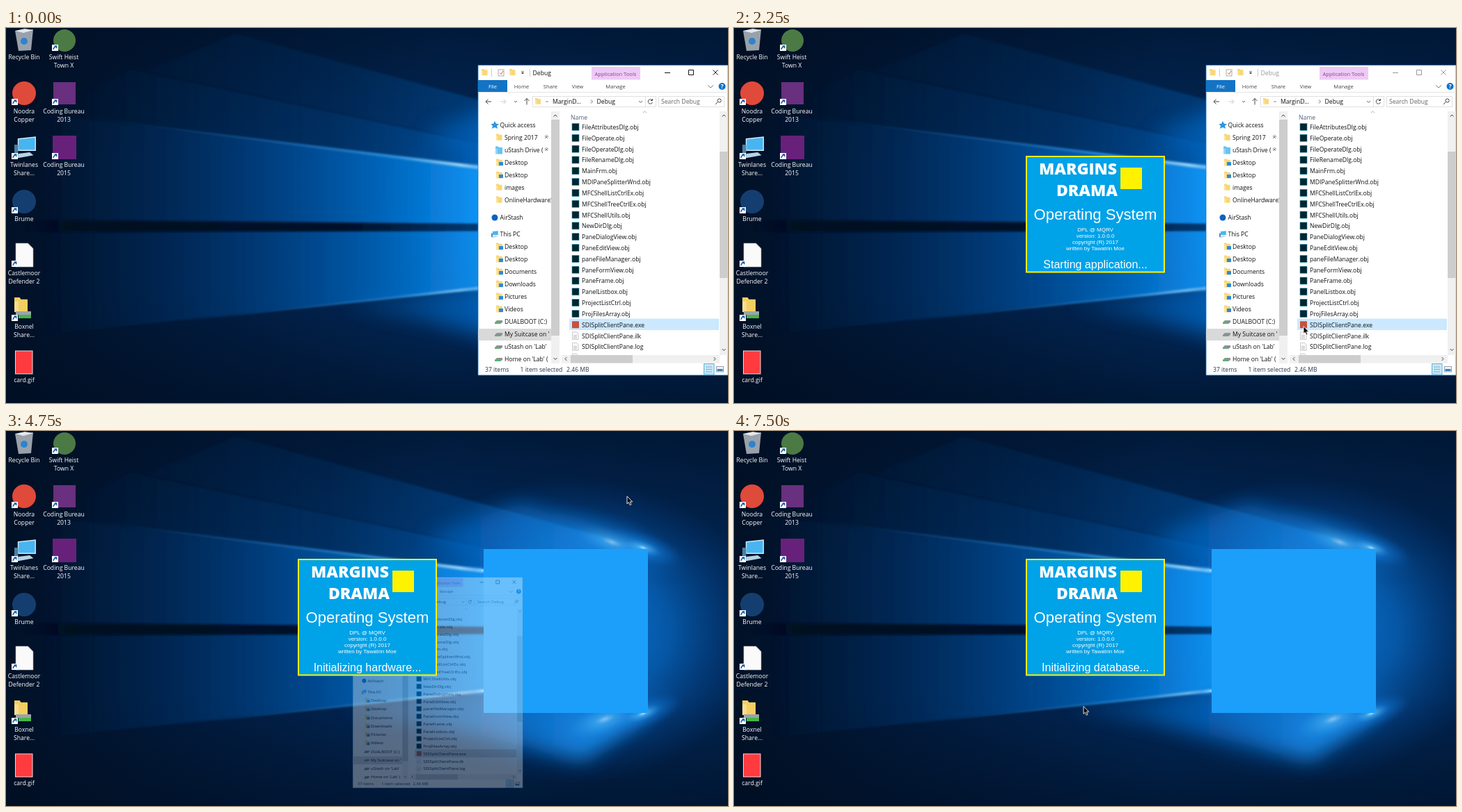
Animation, 1037 px wide and 540 px high, one loop 8 s. Source, as an HTML page:

```html
<!DOCTYPE html>
<html lang="en">
<head>
<meta charset="utf-8">
<title>Desktop startup</title>
<style>
html, body { margin: 0; width: 100%; height: 100%; overflow: hidden; background: #01142e; }
svg { display: block; width: 100vw; height: 100vh; }
text { font: 8.65px "Open Sans", "Noto Sans", sans-serif; fill: #111; white-space: pre; }
.label text { fill: #fff; text-anchor: middle; }
.ribbon text { font-size: 7.6px; fill: #444; text-anchor: middle; }
.splash text { font-family: "Liberation Sans", Arial, sans-serif; fill: #fff; text-anchor: middle; }
.splash .brand { font: 800 23px "Open Sans", sans-serif; text-anchor: end; }
.splash .title { font-size: 22.1px; }
.splash .small { font-size: 8px; }
.splash .status { font-size: 16px; }
.line { fill: none; stroke: #444; }
</style>
</head>
<body>
<svg id="stage" viewBox="0 0 1037 540" preserveAspectRatio="none"></svg>
<script>
const text = (x, y, s, attrs = '') => `<text x="${x}" y="${y}" ${attrs}>${s}</text>`;
const rect = (x, y, w, h, fill, attrs = '') =>
  `<rect x="${x}" y="${y}" width="${w}" height="${h}" fill="${fill}" ${attrs}/>`;
const disc = (x, y, r, fill) => `<circle cx="${x}" cy="${y}" r="${r}" fill="${fill}"/>`;
const poly = (points, fill, attrs = '') => `<polygon points="${points}" fill="${fill}" ${attrs}/>`;
const line = (d, attrs = '') => `<path class="line" d="${d}" ${attrs}/>`;
const stops = list => list.map(([at, color, alpha = 1]) =>
  `<stop offset="${at}" stop-color="${color}" stop-opacity="${alpha}"/>`).join('');
const across = (id, x1, x2, list) =>
  `<linearGradient id="${id}" gradientUnits="userSpaceOnUse" x1="${x1}" x2="${x2}" y1="0" y2="0">${stops(list)}</linearGradient>`;
const radial = (id, list) => `<radialGradient id="${id}">${stops(list)}</radialGradient>`;
const glow = (x, y, rx, ry, id, attrs = '') =>
  `<ellipse cx="${x}" cy="${y}" rx="${rx}" ry="${ry}" fill="url(#${id})" ${attrs}/>`;
const blur = (id, amount) =>
  `<filter id="${id}" x="-20%" y="-50%" width="140%" height="200%"><feGaussianBlur stdDeviation="${amount}"/></filter>`;

function wallpaper() {
  const defs = `<defs>
    ${across('base', 0, 1037, [[0, '#011127'], [.3, '#011d42'], [.6, '#022a5c'], [1, '#01244f']])}
    <linearGradient id="shade" x2="0" y2="1">${stops([[0, '#000d20', .55], [.35, '#000d20', 0], [.7, '#000d20', 0], [1, '#000d20', .6]])}</linearGradient>
    ${across('beam', 50, 690, [[0, '#013064', 0], [.3, '#023a78', .45], [.6, '#0456a6', .78], [.85, '#067ad8', .92], [1, '#0a96f6']])}
    ${across('haze', 100, 923, [[0, '#04488c', 0], [.45, '#04488c', .45], [.7, '#0868c4', .75], [1, '#22a0ff', .95]])}
    ${across('gap', 20, 690, [[0, '#000b1c', 0], [.12, '#000b1c', .85], [.7, '#000f26', .9], [1, '#02376e', .85]])}
    ${across('ray', 60, 686, [[0, '#1a78d0', 0], [.3, '#1a7ad6', .5], [.8, '#36a5f8', .85], [1, '#c8f0ff']])}
    ${radial('halo', [[0, '#0a88f0', .95], [.5, '#0870d0', .65], [1, '#04489a', 0]])}
    ${radial('flare', [[0, '#e8fbff', .95], [.12, '#5cc4ff', .75], [.45, '#1585e8', .4], [1, '#0a68c4', 0]])}
    ${blur('soft', 1.5)}${blur('wide', 14)}
    <clipPath id="nav"><rect x="678" y="120" width="105" height="363"/></clipPath>
    <clipPath id="list"><rect x="797" y="120" width="228" height="351"/></clipPath>
  </defs>`;
  return defs + rect(0, 0, 1037, 540, 'url(#base)') + rect(0, 0, 1037, 540, 'url(#shade)')
    + glow(815, 287, 280, 220, 'halo')
    + poly('923,170 330,8 200,62 787,189', 'url(#haze)', 'opacity=".45" filter="url(#soft)"')
    + poly('923,172 740,105 600,150 686,200', 'url(#haze)', 'opacity=".8" filter="url(#wide)"')
    + poly('787,189 180,60 50,122 686,201', 'url(#haze)', 'opacity=".8" filter="url(#soft)"')
    + poly('923,403 686,374 480,398 690,440 830,475', 'url(#haze)', 'opacity=".95" filter="url(#wide)"')
    + poly('690,202 50,124 50,278 690,283', 'url(#beam)', 'filter="url(#soft)"')
    + poly('690,292 50,293 50,442 690,374', 'url(#beam)', 'opacity=".9" filter="url(#soft)"')
    + poly('20,276 690,282 690,292 20,294', 'url(#gap)', 'filter="url(#soft)"')
    + poly('60,123 686,199 686,204', 'url(#ray)', 'filter="url(#soft)"')
    + poly('250,422 686,372 686,376', 'url(#ray)', 'opacity=".8" filter="url(#soft)"')
    + glow(686, 201, 34, 8, 'flare', 'transform="rotate(7 686 201)"')
    + glow(686, 374, 34, 8, 'flare', 'transform="rotate(-7 686 374)"')
    + glow(915, 168, 60, 22, 'flare', 'transform="rotate(18 915 168)"')
    + glow(870, 160, 120, 42, 'flare', 'opacity=".55" transform="rotate(20 870 160)"')
    + glow(915, 407, 60, 22, 'flare', 'transform="rotate(-20 915 407)"')
    + glow(860, 415, 120, 48, 'flare', 'opacity=".55" transform="rotate(-20 860 415)"')
    + rect(686, 170, 236, 236, '#1c9ffa');
}

const folder = (x, y, fill = '#f8d775', s = 1) =>
  `<g transform="translate(${x} ${y}) scale(${s})">${poly('0,0 4,0 5,1.5 10,1.5 10,11 0,11', fill)}${rect(0, 3, 3, 8, '#fff', 'opacity=".3"')}</g>`;
const monitor = (x, y, s) =>
  `<g transform="translate(${x} ${y}) scale(${s})">${poly('2,1 11,0 11,7 2,7', '#48b5f0', 'stroke="#cfeaf8" stroke-width=".5"')}${poly('0,9 8,8 10,9.5 2,11', '#b8d4e4')}${rect(0, 4, 2, 6, '#4c7e9e')}</g>`;
const drive = (x, y) => poly(`${x},${y + 5} ${x + 3},${y + 2} ${x + 11},${y + 2} ${x + 11},${y + 5} ${x + 8},${y + 7} ${x},${y + 7}`, '#8b9297')
  + rect(x + 1, y + 5, 5, 1.5, '#39c94c');
const shortcut = (x, y) => rect(x, y, 9, 9, '#fff')
  + line(`M${x + 2} ${y + 7}Q${x + 2} ${y + 4} ${x + 6.5} ${y + 2.5}M${x + 3.5} ${y + 2}h3.2v3.2`, 'style="stroke:#145ca8;stroke-width:1.4"');
const sheet = (x, y, w, h) => poly(`${x},${y} ${x + w * .7},${y} ${x + w},${y + h * .22} ${x + w},${y + h} ${x},${y + h}`, '#fafafa', 'stroke="#aaa" stroke-width=".6"');

function desktop() {
  const icons = [
    [26, 45, ['Recycle Bin'], poly('13,4 39,2 36,32 18,33', '#b4bcc3', 'opacity=".85"') + poly('13,4 27,1 39,3 25,7', '#e4e8ea') + disc(26, 19, 5, '#2e83cf')],
    [83, 45, ['Swift Heist', 'Town X'], disc(84, 18, 16, '#4c7a45'), 24],
    [26, 123, ['Noodra', 'Copper'], disc(26, 94, 17, '#e04a3a'), 102],
    [83, 123, ['Coding Bureau', '2013'], rect(68, 78, 32, 32, '#68307f'), 102],
    [26, 200, ['Twinlanes', 'Share...'], monitor(12, 157, 2.75), 180],
    [83, 200, ['Coding Bureau', '2015'], rect(67, 155, 34, 34, '#68217a'), 180],
    [26, 278, ['Brume'], disc(26, 250, 17, '#153e70'), 258],
    [26, 356, ['Castlemoor', 'Defender 2'], sheet(14, 310, 25, 34), 335],
    [26, 433, ['Boxnel', 'Share...'], folder(12, 388, '#f3cf62', 1.9) + rect(14, 408, 22, 5, '#9aa5a8') + rect(18, 413, 18, 5, '#43b649'), 413],
    [26, 510, ['card.gif'], rect(13.5, 465, 24.5, 33, '#ff3b40', 'stroke="#f5d8d8"')]
  ];
  return '<g class="label">' + icons.map(([x, y, names, art, arrowY]) =>
    art + (arrowY ? shortcut(x === 26 ? 8 : 66, arrowY) : '')
    + names.map((name, i) => text(x, y + i * 12, name)).join('')).join('') + '</g>';
}

function navigation() {
  const items = [
    ['Quick access', 143, 'star'], ['Spring 2017', 161], ['uStash Drive (', 179, 'blue'], ['Desktop', 197, 'badge'],
    ['Desktop', 215, 'badge'], ['images', 233], ['OnlineHardwareS', 251], ['AirStash', 276, 'cloud'],
    ['This PC', 300, 'pc'], ['Desktop', 318, 'badge'], ['Desktop', 336, 'badge'], ['Documents', 354, 'badge'],
    ['Downloads', 372, 'badge'], ['Pictures', 390, 'badge'], ['Videos', 408, 'badge'], ['DUALBOOT (C:)', 426, 'drive'],
    ["My Suitcase on '", 444, 'drive'], ["uStash on 'Lab'", 462, 'drive'], ["Home on 'Lab' (", 480, 'drive']
  ];
  const art = {
    star: y => poly(`702,${y - 9} 704,${y - 5} 708,${y - 5} 705,${y - 2} 706,${y + 2} 702,${y} 698,${y + 2} 699,${y - 2} 696.5,${y - 5} 700,${y - 5}`, '#2b95e0'),
    blue: y => folder(703, y - 8.5, '#66c3f2'),
    badge: y => folder(704, y - 8.5, '#f8d775', .9) + rect(708, y - 4, 6, 5, '#3189d4'),
    cloud: y => disc(702, y - 3, 4.5, '#0a63c2'),
    pc: y => monitor(697, y - 8, .9),
    drive: y => drive(702, y - 7)
  };
  const pin = y => line(`M774 ${y}l3-3m-3-1l4 4m-2-5l3 3`, 'style="stroke:#777"');
  return '<g clip-path="url(#nav)">' + rect(678, 433, 105, 17, '#d9d9d9')
    + items.map(([name, y, kind]) => (art[kind] ? art[kind](y) : folder(704, y - 8.5, '#f8d775', .85))
      + text(/star|cloud|pc/.test(kind) ? 709.5 : 716, y, name)).join('')
    + pin(159) + pin(177) + '</g>'
    + rect(783, 120, 12, 363, '#f0f0f0') + rect(783, 132, 12, 311, '#cdcdcd')
    + line('M786.5 127.5l2.5-2.5 2.5 2.5M786.5 475l2.5 2.5 2.5-2.5');
}

function fileList() {
  const objects = `FileAttributesDlg FileOperate FileOperateDlg FileRenameDlg MainFrm MDIPaneSplitterWnd
    MFCShellListCtrlEx MFCShellTreeCtrlEx MFCShellUtils NewDirDlg PaneDialogView PaneEditView paneFileManager
    PaneFormView PaneFrame PanelListbox ProjectListCtrl ProjFilesArray`.split(/\s+/).map(name => name + '.obj');
  const files = [...objects, ...['exe', 'ilk', 'log'].map(ext => 'SDISplitClientPane.' + ext)];
  const icon = (name, y) => name.endsWith('obj') ? rect(813, y - 8.5, 10, 10, '#04252f', 'stroke="#1f8ea8" stroke-width=".6"')
    : name.endsWith('exe') ? rect(813, y - 8.5, 10, 10, '#c8503c')
    : sheet(813.5, y - 9, 8.5, 11) + line(`M815 ${y - 4}h5m-5 2h5m-5 2h5`, 'style="stroke:#999;stroke-width:.6"');
  return rect(809, 418.5, 215, 16.5, '#cce8ff') + rect(809, 418.5, 215, 16.5, '#d9d9d9', 'id="dimRow"')
    + '<g clip-path="url(#list)">' + text(811, 132, 'Name', 'style="fill:#4c607a"')
    + files.map((name, i) => {
      const y = 146 + i * 15.82;
      return icon(name, y) + text(827, y, name);
    }).join('') + sheet(813.5, 469, 8.5, 11) + '</g>'
    + line('M915 122l2.5-2 2.5 2', 'style="stroke:#888;stroke-width:.7"')
    + rect(1025, 120, 11.5, 351, '#f0f0f0') + rect(1025, 178, 11.5, 182, '#cdcdcd')
    + rect(798, 471, 227, 11.5, '#f0f0f0') + rect(811, 471, 89, 11.5, '#cdcdcd')
    + line('M1028.5 127.5l2.5-2.5 2.5 2.5M1028.5 462l2.5 2.5 2.5-2.5M805.5 474l-2.5 2.5 2.5 2.5M1016.5 474l2.5 2.5-2.5 2.5');
}

function explorer() {
  const titleBar = color => text(756.5, 67.5, 'Debug', `style="fill:${color}"`)
    + line('M946 64.5h8M980.5 60.5h7v7h-7zM1015.5 60.5l7 7m0-7l-7 7', `style="stroke:${color}"`);
  return `<g id="explorer">`
    + rect(678, 53.5, 359, 446.5, '#fff', 'stroke="#1878c0" stroke-width=".8"')
    + rect(841, 56, 70, 18.5, '#efc9f6')
    + folder(683, 59, '#f8d775', .85) + folder(723, 59, '#f8d775', .85)
    + rect(707, 60, 8, 9, '#fff', 'stroke="#999" stroke-width=".8"')
    + line('M709 64.5l2 2 3-4.5', 'style="stroke:#d2572c"')
    + line('M697.5 59v11M752.5 59v11', 'style="stroke:#ccc"') + poly('740,64 744,64 742,66.5', '#333') + line('M740 62.5h4', 'style="stroke-width:.7"')
    + `<g id="activeTitle">${titleBar('#111')}</g><g id="idleTitle">${titleBar('#999')}</g>`
    + rect(678, 75, 42, 17, '#1374c5')
    + '<g class="ribbon">' + text(699, 87, 'File', 'style="fill:#fff"') + text(740.5, 87, 'Home') + text(782, 87, 'Share')
    + text(821, 87, 'View') + text(875.5, 87, 'Manage') + text(875.5, 69, 'Application Tools', 'style="fill:#7a4a85"') + '</g>'
    + line('M1008 82.5l4 3.5 4-3.5', 'style="stroke:#777"') + disc(1028.5, 84, 5, '#0b72c8')
    + text(1028.5, 87, '?', 'text-anchor="middle" style="fill:#fff;font-weight:700"')
    + line('M678 92.5h359', 'style="stroke:#e2e3e4"')
    + line('M697 106h-8m3.5-3.5l-3.5 3.5 3.5 3.5M748 110.5v-9m-3.5 3.5l3.5-3.5 3.5 3.5')
    + line('M710 106h8m-3.5-3.5l3.5 3.5-3.5 3.5', 'style="stroke:#ccc"')
    + line('M730 105l2 2 2-2M909 105l2.5 2.5 2.5-2.5M840 103.5l2.5 2.5-2.5 2.5', 'style="stroke:#666"')
    + line('M756.5 98.5h177v15h-177zM937.5 98.5h94v15h-94zM918.5 98.5v15', 'style="stroke:#e0e0e0"')
    + folder(760, 101, '#f8d775', .8) + line('M775 106h4', 'style="stroke:#888"')
    + text(785, 109, 'MarginD...') + text(848.5, 109, 'Debug') + text(941, 109, 'Search Debug', 'style="fill:#666"')
    + line('M928 104a3.2 3.2 0 1 0 .5 3M928.5 102v2.5h-2.5')
    + line('M1022.5 106.5l-3.5 3.5M1022 104.5a2.6 2.6 0 1 1 5.2 0a2.6 2.6 0 1 1-5.2 0')
    + navigation() + fileList()
    + text(688, 494.5, '37 items', 'style="fill:#26344c"') + text(738.5, 494.5, '1 item selected', 'style="fill:#26344c"') + text(805, 494.5, '2.46 MB', 'style="fill:#26344c"')
    + rect(1002.5, 483.5, 14.5, 15.5, '#c9e8f8', 'stroke="#58b4dc"') + line('M1005.5 488h9m-9 3.5h9m-9 3.5h9', 'style="stroke:#789;stroke-dasharray:2 1"')
    + rect(1020.5, 487.5, 10, 7.5, '#eef4f8', 'stroke="#889" stroke-width=".8"') + rect(1021.5, 491, 8, 3, '#3b83b8')
    + '</g>';
}

function splash() {
  const messages = ['Starting application...', 'Initializing hardware...', 'Initializing database...'];
  const credits = ['DPL @ MQRV', 'version: 1.0.0.0', 'copyright (R) 2017', 'written by Tawatrin Moe'];
  return '<g id="splash" class="splash">' + rect(420, 185, 198, 166.5, '#00a2e8', 'stroke="#fff200" stroke-width="2"')
    + text(550, 211, 'MARGINS', 'class="brand"') + text(551, 242, 'DRAMA', 'class="brand"')
    + rect(555, 201, 31, 31, '#fff200')
    + text(519, 276, 'Operating System', 'class="title"')
    + credits.map((s, i) => text(519, 292.5 + i * 9.1, s, 'class="small"')).join('')
    + messages.map((s, i) => text(519, 345.5, s, `class="status" id="status${i}"`)).join('') + '</g>';
}

const pointer = '<path id="pointer" d="M0 0V10.8L2.4 8.6 4.2 12.6 6 11.8 4.3 7.9H7.7Z" fill="#000" stroke="#fff" stroke-width=".9"/>';
document.getElementById('stage').innerHTML = wallpaper() + desktop() + explorer() + splash() + pointer;

const LOOP = 8000;

// Each step is [time in ms, value] and holds until the next one.
function play(id, property, steps) {
  const frames = [...steps, [LOOP, steps.at(-1)[1]]].map(([time, value]) =>
    ({ offset: time / LOOP, [property]: value, easing: 'step-end' }));
  document.getElementById(id).animate(frames, { duration: LOOP, iterations: Infinity });
}
const moveTo = ([time, x, y]) => [time, `translate(${x}px, ${y}px)`];

play('pointer', 'opacity', [[0, 0], [500, 1]]);
play('pointer', 'transform', [
  [0, 825, 448], [750, 825.5, 425], [1000, 813.5, 433], [1250, 818, 429.5], [3750, 909, 106.5],
  [4000, 942, 51.5], [4250, 960, 61], [4500, 952, 63], [4750, 892, 94], [5000, 691, 319.5], [5250, 502, 396.5]
].map(moveTo));
play('explorer', 'transform', [[0, 'translate(0px, 0px) scale(1)'], [4750, 'translate(37px, 174px) scale(.68)']]);
play('explorer', 'opacity', [[0, 1], [4750, .34], [5000, 0]]);
play('activeTitle', 'opacity', [[0, 1], [2250, 0], [4500, 1]]);
play('idleTitle', 'opacity', [[0, 0], [2250, 1], [4500, 0]]);
play('dimRow', 'opacity', [[0, 0], [3750, 1]]);
play('splash', 'opacity', [[0, 0], [2250, 1]]);
play('status0', 'opacity', [[0, 1], [4250, 0]]);
play('status1', 'opacity', [[0, 0], [4250, 1], [6250, 0]]);
play('status2', 'opacity', [[0, 0], [6250, 1]]);
</script>
</body>
</html>
```
